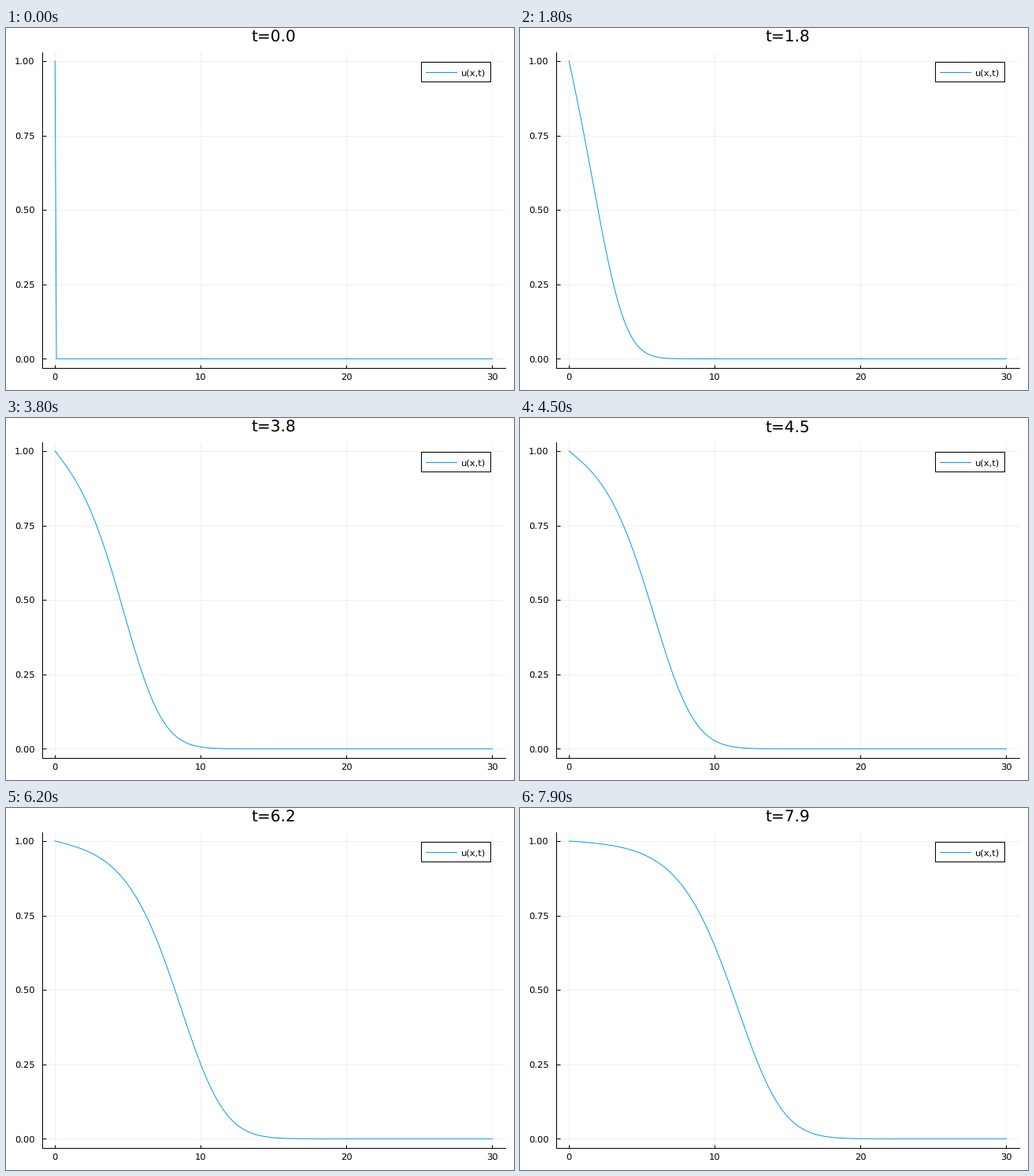
Write a matplotlib script that moves like this. It is 645x460 px and loops after 8000 ms.

```python
import numpy as np
import matplotlib.pyplot as plt
from matplotlib.animation import FuncAnimation
from matplotlib.lines import Line2D
from matplotlib.patches import Rectangle

W, H, DPI = 645, 460, 100
FRAMES, INTERVAL = 80, 100
BLUE = "#009afa"
PX = 72 / DPI  # points per pixel
SMALL, LARGE = 11.5 * PX, 20.1 * PX

plt.rcParams.update({
    "font.family": "DejaVu Sans",
    "text.hinting": "none",
    "path.simplify": False,
})


def rate(u):
    """Fisher-KPP right-hand side, both ends held fixed."""
    du = np.zeros_like(u)
    du[1:-1] = (u[2:] - 2 * u[1:-1] + u[:-2]) / dx**2 + u[1:-1] * (1 - u[1:-1])
    return du


def advance(u, span, steps=25):
    """Runge-Kutta 4 over the given time span."""
    h = span / steps
    for _ in range(steps):
        k1 = rate(u)
        k2 = rate(u + h / 2 * k1)
        k3 = rate(u + h / 2 * k2)
        k4 = rate(u + h * k3)
        u = u + h / 6 * (k1 + 2 * k2 + 2 * k3 + k4)
    return u


x = np.linspace(0, 30, 301)
dx = x[1] - x[0]
states = [np.where(x == 0, 1.0, 0.0)]
for _ in range(FRAMES - 1):
    states.append(advance(states[-1], 0.1))

# The small margin keeps the pixel size from rounding down
fig = plt.figure(figsize=((W + 0.01) / DPI, (H + 0.01) / DPI), dpi=DPI,
                 facecolor="white")


def label(px, py, s, size=SMALL, ha="center"):
    """Text with its baseline at a pixel measured from the top left."""
    return fig.text(px / W, 1 - py / H, s, fontsize=size, ha=ha, va="baseline")


# Plot area
left, right, top, bottom = 45.6, 634.0, 30.6, 431.7
ax = fig.add_axes([left / W, 1 - bottom / H, (right - left) / W, (bottom - top) / H])
ax.set(xlim=(-0.9, 30.9), ylim=(-0.03, 1.03),
       xticks=[0, 10, 20, 30], yticks=[0, 0.25, 0.5, 0.75, 1])
ax.spines[["top", "right"]].set_visible(False)
ax.spines[["left", "bottom"]].set_linewidth(PX)
ax.tick_params(direction="in", length=4.5 * PX, width=PX,
               labelbottom=False, labelleft=False)
ax.grid(color="black", alpha=0.06, linewidth=PX)
ax.set_axisbelow(True)

for v in ax.get_xticks():
    label(left + (v + 0.9) / 31.8 * (right - left), 447, f"{v:.0f}")
for v in ax.get_yticks():
    label(36.5, bottom - (v + 0.03) / 1.06 * (bottom - top) + 4, f"{v:.2f}", ha="right")

curve, = ax.plot(x, states[0], color=BLUE, linewidth=PX, clip_on=False)
title = label(340, 17.5, "t=0.0", LARGE)

# Legend
fig.add_artist(Rectangle((526.5 / W, 1 - 68.5 / H), 88 / W, 25 / H,
                         facecolor="white", edgecolor="black", linewidth=PX))
fig.add_artist(Line2D([533 / W, 572 / W], [1 - 56.5 / H] * 2,
                      color=BLUE, linewidth=PX))
label(577.5, 61, "u(x,t)", ha="left")


def update(i):
    curve.set_ydata(states[i])
    title.set_text(f"t={i / 10:.1f}")
    return curve, title


anim = FuncAnimation(fig, update, frames=FRAMES, interval=INTERVAL,
                     repeat=True, repeat_delay=0, blit=False)
plt.show()
```
